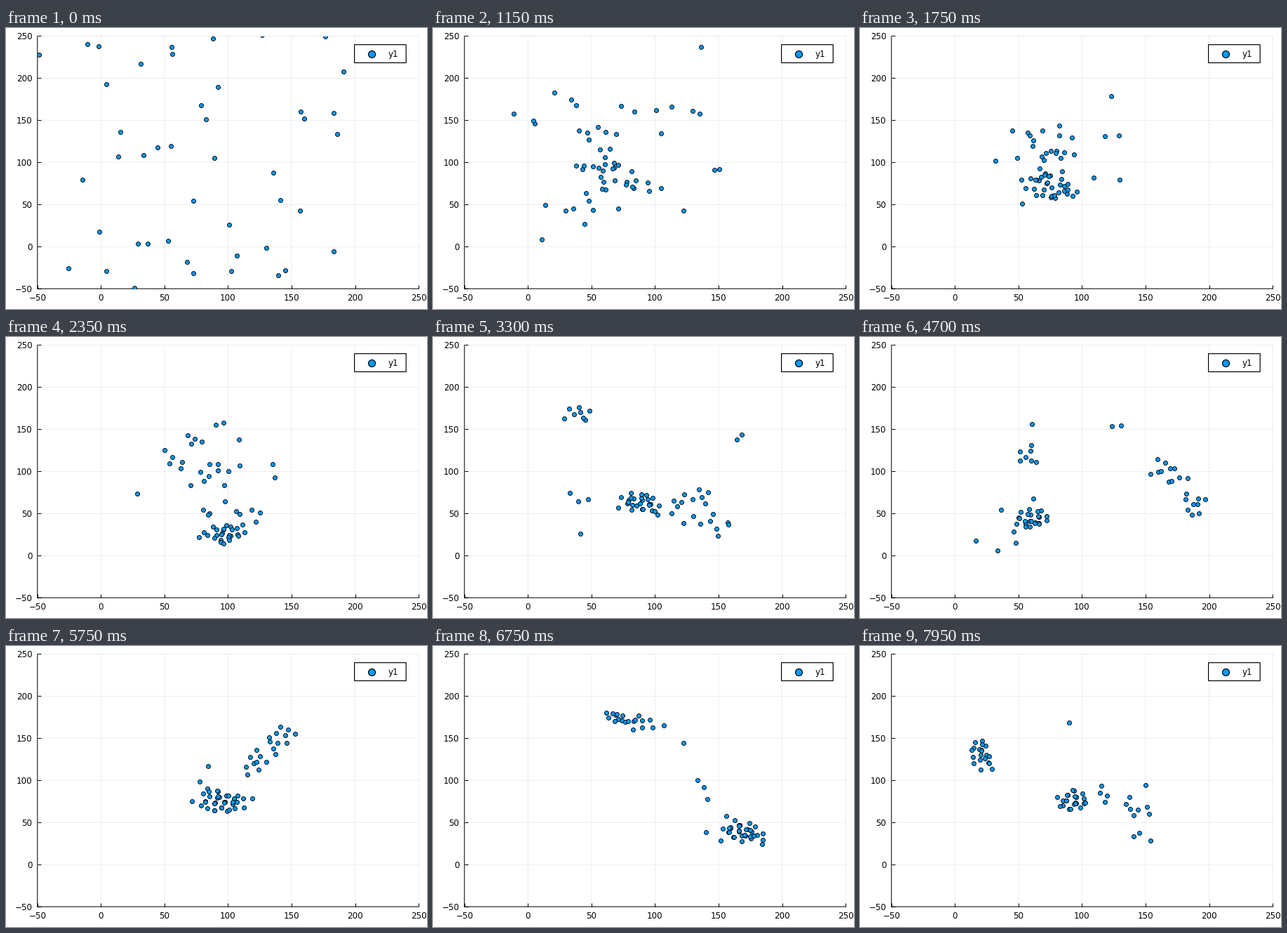
A matplotlib script for the animation above (8000 ms loop, 600 by 400 pixels).

```python
import numpy as np
import matplotlib.pyplot as plt
from matplotlib.animation import FuncAnimation
from matplotlib.patches import Rectangle

W, H, DPI = 600, 400, 100
FRAMES, INTERVAL = 160, 50
BLUE = "#009AFA"
PX = 72 / DPI  # points per pixel

COUNT = 60
FOLLOWERS = 24  # boids drawn to the moving hub
LOW, HIGH = 26, 172  # beyond these a boid turns back
TURN = 0.65
MIN_SPEED, MAX_SPEED = 2.5, 5
VIEW, GAP = 28, 7

# the hub passes these places at these frames
HUB_TIMES = [0, 23, 47, 66, 94, 135, 159]
HUB_X = [60, 60, 95, 80, 40, 160, 103]
HUB_Y = [110, 85, 27, 52, 65, 50, 76]


def limit_speed(vel, low, high):
    speed = np.linalg.norm(vel, axis=1, keepdims=True) + 1e-9
    return vel * np.clip(speed, low, high) / speed


def step(pos, vel, frame):
    """Move the swarm on by one frame."""
    diff = pos[None] - pos[:, None]
    dist = np.linalg.norm(diff, axis=2)
    near = ((dist < VIEW) & (dist > 0)).astype(float)
    close = ((dist < GAP) & (dist > 0)).astype(float)
    total = np.maximum(near.sum(axis=1, keepdims=True), 1)

    cohere = (near[..., None] * diff).sum(axis=1) / total
    align = near @ vel / total - vel * (near.sum(axis=1, keepdims=True) > 0)
    separate = -(close[..., None] * diff).sum(axis=1)
    vel = vel + 0.012 * cohere + 0.08 * align + 0.05 * separate

    hub = [np.interp(frame, HUB_TIMES, axis) for axis in (HUB_X, HUB_Y)]
    vel[:FOLLOWERS] += 0.03 * (hub - pos[:FOLLOWERS])
    vel += TURN * (pos < LOW) - TURN * (pos > HIGH)
    vel = limit_speed(vel, MIN_SPEED, MAX_SPEED)
    return pos + vel, vel


def simulate():
    rng = np.random.default_rng(7)
    pos = rng.uniform((-85, -85), (192, 285), (COUNT, 2))
    vel = rng.normal(0, 2, (COUNT, 2))
    track = [pos]
    for frame in range(1, FRAMES):
        pos, vel = step(pos, vel, frame)
        track.append(pos)
    return track


TRACK = simulate()

plt.rcParams["font.family"] = "DejaVu Sans"
fig = plt.figure(figsize=(W / DPI, H / DPI), dpi=DPI, facecolor="white")
ax = fig.add_axes([44.8 / W, 28.9 / H, 543.3 / W, 359.6 / H])
ax.set(xlim=(-50, 250), ylim=(-50, 250))
ax.set_xticks(range(-50, 251, 50))
ax.set_yticks(range(-50, 251, 50))
ax.set_axisbelow(True)
ax.grid(color="black", alpha=0.07, linewidth=PX, clip_on=False, snap=False)
ax.tick_params(direction="in", length=5 * PX, width=PX, labelsize=8.6)
ax.tick_params(axis="x", pad=5.2)
ax.tick_params(axis="y", pad=5.4)
for line in ax.get_xticklines() + ax.get_yticklines():
    line.set_snap(False)
for side in ("top", "right"):
    ax.spines[side].set_visible(False)
for side in ("left", "bottom"):
    ax.spines[side].set_linewidth(PX)
    ax.spines[side].set_snap(False)

dots, = ax.plot([], [], "o", color=BLUE, markersize=6 * PX, snap=False,
                markeredgecolor="black", markeredgewidth=0.9 * PX, zorder=3)

# legend, laid out in stage pixels
stage = fig.add_axes([0, 0, 1, 1])
stage.set(xlim=(0, W), ylim=(H, 0))
stage.axis("off")
stage.add_patch(Rectangle((496.6, 23.7), 73.6, 25.8, facecolor="white",
                          edgecolor="black", linewidth=1.2 * PX, snap=False))
stage.plot([520.6], [36.6], "o", color=BLUE, markersize=10 * PX, snap=False,
           markeredgecolor="black", markeredgewidth=1.2 * PX)
stage.text(544.5, 41, "y1", fontsize=8.6, va="baseline")


def update(frame):
    dots.set_data(*TRACK[frame].T)
    return dots,


anim = FuncAnimation(fig, update, frames=FRAMES, interval=INTERVAL,
                     init_func=lambda: update(0), repeat=True, repeat_delay=0)
plt.show()
```
